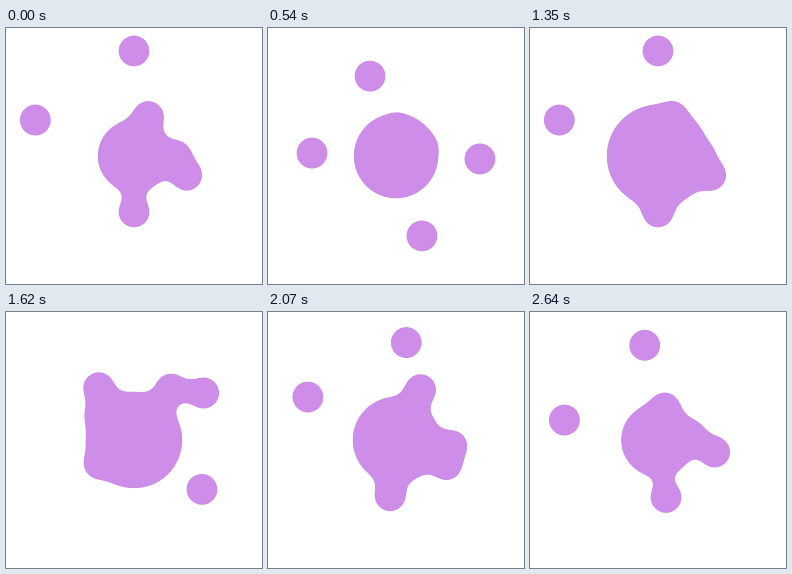
An HTML page for the animation above (2.67 s loop, 256 by 256 pixels).

```html
<!DOCTYPE html>
<html lang="en">
<head>
<meta charset="utf-8">
<title>Gooey orbit</title>
<style>
  html, body { margin: 0; width: 100%; height: 100%; overflow: hidden; background: #fff; }
  svg { display: block; width: 100vw; height: 100vh; }
</style>
</head>
<body>
<svg viewBox="-128 -128 256 256">
  <filter id="goo" filterUnits="userSpaceOnUse" x="-168" y="-168" width="336" height="336"
          color-interpolation-filters="sRGB">
    <feGaussianBlur stdDeviation="7"/>
    <feColorMatrix values="1 0 0 0 0  0 1 0 0 0  0 0 1 0 0  0 0 0 20 -11.5"/>
  </filter>
  <g filter="url(#goo)" fill="#cd8de8">
    <circle id="core"/>
    <g class="arm"><circle r="18.5"/><circle r="18.5"/><circle r="18.5"/><circle r="18.5"/></g>
    <g class="arm"><circle r="18.5"/><circle r="18.5"/><circle r="18.5"/><circle r="18.5"/></g>
  </g>
</svg>
<script>
const STEP = 30, STEPS = 89, CYCLE = 90, REACH = 105;
const core = document.getElementById('core');
const arms = [...document.querySelectorAll('.arm')];

// Triangle wave over one cycle: 1 at the peak, -1 half a cycle later.
const triangle = (n, peak) =>
  Math.abs((n - peak + CYCLE) % CYCLE - CYCLE / 2) / (CYCLE / 4) - 1;

// Piecewise linear path through [step, value] keys.
function along(keys, n) {
  const i = Math.max(1, keys.findIndex(key => key[0] >= n));
  const [[n0, v0], [n1, v1]] = [keys[i - 1], keys[i]];
  return v0 + (v1 - v0) * (n - n0) / (n1 - n0);
}

const unevenSwing = [[0, 56], [34.5, -REACH], [79, 102.7], [90, 48]];

function draw(n) {
  core.setAttribute('r', 46 - 7.4 * triangle(n, 0));
  const swings = [
    ['cx', REACH * triangle(n, 13.5)],
    ['cx', REACH * triangle(n, 67.5)],
    ['cy', REACH * triangle(n, 45)],
    ['cy', along(unevenSwing, n)]
  ];
  arms.forEach((arm, k) => {
    arm.setAttribute('transform', `rotate(${4 * n - 70 * k})`);
    swings.forEach(([axis, value], i) => arm.children[i].setAttribute(axis, value));
  });
}

function tick() {
  draw(Math.floor(performance.now() / STEP) % STEPS);
  requestAnimationFrame(tick);
}
tick();
</script>
</body>
</html>
```
